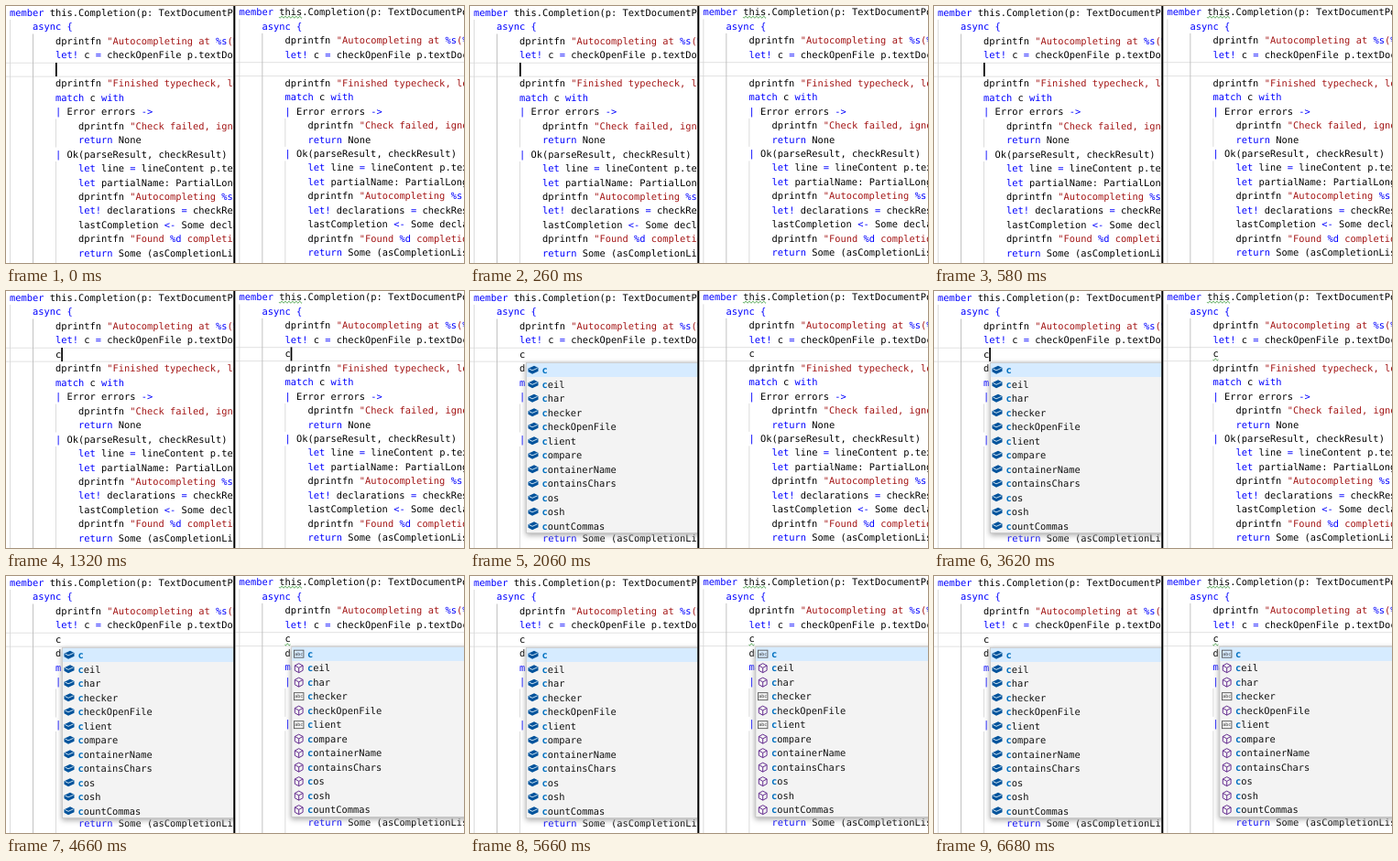
These frames come from a looping animation (500 px wide and 281 px high, 6720 ms). An HTML page with a canvas:

```html
<!DOCTYPE html>
<html lang="en">
<head>
<meta charset="utf-8">
<title>Completion in two editors</title>
<style>
html, body { margin: 0; width: 100%; height: 100%; overflow: hidden; background: #fff; }
canvas { display: block; width: 500px; height: 281px; }
</style>
</head>
<body>
<canvas id="stage"></canvas>
<script>
const canvas = document.getElementById('stage');
const ctx = canvas.getContext('2d');
const ratio = window.devicePixelRatio || 1;
canvas.width = 500 * ratio;
canvas.height = 281 * ratio;

const LOOP = 6720;
const CHAR = 6.25, LINE = 15.46, LEFT = 4;
const SIZE = 10.38;
const FONT = '"DejaVu Sans Mono", "Liberation Mono", monospace';
const BLUE = '#0000ff', RED = '#a31515', BLACK = '#000';

const code = [
  'member this.Completion(p: TextDocumentPositionParams)',
  '    async {',
  '        dprintfn "Autocompleting at %s(%d)"',
  '        let! c = checkOpenFile p.textDocument',
  '',
  '        dprintfn "Finished typecheck, looking"',
  '        match c with',
  '        | Error errors ->',
  '            dprintfn "Check failed, ignoring"',
  '            return None',
  '        | Ok(parseResult, checkResult) ->',
  '            let line = lineContent p.textDocument',
  '            let partialName: PartialLongName',
  '            dprintfn "Autocompleting %s"',
  '            let! declarations = checkResult',
  '            lastCompletion <- Some declarations',
  '            dprintfn "Found %d completions"',
  '            return Some (asCompletionList'
];
const items = ['c', 'ceil', 'char', 'checker', 'checkOpenFile', 'client',
  'compare', 'containerName', 'containsChars', 'cos', 'cosh', 'countCommas'];
const wordItems = [0, 3, 5];
const keyword = /^(member|async|let!?|match|with|return|->|<-|[|{=])$/;

// Split a line into coloured pieces with their columns.
function tokenize(line) {
  const pieces = [];
  let quoted = false;
  for (const m of line.matchAll(/"|%[sd]|->|<-|[|{=]|\w+!?|[^\s\w]/g)) {
    const text = m[0];
    let color = keyword.test(text) ? BLUE : BLACK;
    if (text === '"') quoted = !quoted;
    if (quoted || text === '"') color = text[0] === '%' ? BLUE : RED;
    pieces.push({ text, color, col: m.index });
  }
  return pieces;
}
const lines = code.map(tokenize);

function write(text, x, y, color, weight = '', size = SIZE) {
  ctx.font = `${weight} ${size}px ${FONT}`;
  ctx.fillStyle = color;
  ctx.fillText(text, x, y);
}

function rect(x, y, w, h, color) {
  ctx.fillStyle = color;
  ctx.fillRect(x, y, w, h);
}

function shape(points, fill, stroke) {
  ctx.beginPath();
  points.forEach(([x, y]) => ctx.lineTo(x, y));
  ctx.closePath();
  if (fill) { ctx.fillStyle = fill; ctx.fill(); }
  if (stroke) { ctx.strokeStyle = stroke; ctx.stroke(); }
}

function squiggle(x, y, width) {
  ctx.beginPath();
  for (let i = 0; i <= width; i += 0.5) ctx.lineTo(x + i, y + Math.sin(i * 1.6));
  ctx.strokeStyle = '#3c9a3c';
  ctx.lineWidth = 0.9;
  ctx.stroke();
}

function solidBox(x, y) {
  shape([[x - 5.5, y - 1.5], [x + 1, y - 4.5], [x + 5.5, y - 2.3],
    [x + 5.5, y + 1.5], [x - 1, y + 4.5], [x - 5.5, y + 2]], '#00539c');
  ctx.beginPath();
  ctx.moveTo(x - 4.5, y - 1.2);
  ctx.lineTo(x - 1, y + 0.6);
  ctx.lineTo(x + 4.6, y - 1.9);
  ctx.strokeStyle = '#e8f2fa';
  ctx.lineWidth = 0.9;
  ctx.stroke();
}

function outlineBox(x, y) {
  ctx.lineWidth = 1;
  shape([[x, y - 5], [x + 4.4, y - 2.7], [x + 4.4, y + 2.6],
    [x, y + 5], [x - 4.4, y + 2.6], [x - 4.4, y - 2.7]], null, '#652d90');
  ctx.beginPath();
  ctx.moveTo(x - 4.4, y - 2.7);
  ctx.lineTo(x, y - 0.3);
  ctx.lineTo(x + 4.4, y - 2.7);
  ctx.moveTo(x, y - 0.3);
  ctx.lineTo(x, y + 5);
  ctx.stroke();
}

function wordIcon(x, y) {
  ctx.strokeStyle = '#555';
  ctx.lineWidth = 0.9;
  ctx.strokeRect(x - 5.2, y - 4, 10.4, 8);
  write('abc', x - 4.4, y + 1.8, '#333', '', 4.9);
}

function popup(top, modern) {
  const x = 61.5, row = 15.5;
  ctx.save();
  ctx.shadowColor = '#a8a8a8';
  ctx.shadowBlur = 6 * ratio;
  ctx.shadowOffsetY = 2 * ratio;
  rect(x - 0.5, top - 0.5, 230, row * 12 + 1, '#c8c8c8');
  ctx.restore();
  rect(x + 0.4, top + 0.4, 229, row * 12 - 0.8, '#f3f3f3');
  rect(x + 0.4, top + 0.4, 229, row - 0.4, '#d6ebff');
  items.forEach((name, i) => {
    const mid = top + (i + 0.5) * row;
    if (!modern) solidBox(69, mid);
    else if (wordItems.includes(i)) wordIcon(69.3, mid);
    else outlineBox(69.3, mid);
    write(name[0], 78.6, mid + 3.8, '#0070c0', 'bold');
    write(name.slice(1), 78.6 + CHAR, mid + 3.8, '#111');
  });
}

function editor(x, y, width, state) {
  ctx.save();
  ctx.beginPath();
  ctx.rect(x, 0, width, 281);
  ctx.clip();
  ctx.translate(x, y);

  rect(0, 61.7, 260, 1.1, '#e4e4e4');
  rect(0, 76.6, 260, 1.1, '#e4e4e4');
  rect(4, 15, 0.9, 270, '#d8d8d8');
  rect(29, 30.5, 0.9, 255, '#bdbdbd');
  rect(54, 123.5, 0.9, 31, '#d8d8d8');
  rect(54, 170, 0.9, 115, '#d8d8d8');

  lines.forEach((pieces, i) => pieces.forEach(p =>
    write(p.text, LEFT + p.col * CHAR, 11 + i * LINE, p.color)));
  const typedX = LEFT + 8 * CHAR;
  if (state.typed) write('c', typedX, 11 + 4 * LINE, BLACK);
  if (state.modern) squiggle(LEFT + 7 * CHAR, 12.8, 4 * CHAR);
  if (state.warned) squiggle(typedX, 75.5, CHAR);
  if (state.cursor) rect(typedX + (state.typed ? CHAR : 0), 62, 1.7, 15, BLACK);
  if (state.open) popup(78.5 + y * 0.8, state.modern);
  ctx.restore();
}

// After 1780 ms the cursor alternates every 610 ms, starting hidden.
const blink = (t, delay) => t >= 1780 && Math.floor((t - 1780 - delay) / 610) % 2 === 1;

function draw(t) {
  ctx.setTransform(ratio, 0, 0, ratio, 0, 0);
  ctx.textRendering = 'geometricPrecision';
  rect(0, 0, 500, 281, '#fff');
  const typed = t >= 1080;
  const held = typed && t < 1780;
  editor(0, 0, 248.5, {
    typed,
    cursor: t < 700 || held || blink(t, 0),
    open: t >= 2060
  });
  editor(250.4, -0.6, 250, {
    typed,
    modern: true,
    cursor: t >= 700 && t < 1780 || t >= 1800 && blink(t, 20),
    warned: t >= 2400,
    open: t >= 4140
  });
  rect(248.3, 0, 2, 281, BLACK);
}

const start = performance.now();
function frame() {
  draw((performance.now() - start) % LOOP);
  requestAnimationFrame(frame);
}
frame();
</script>
</body>
</html>
```
